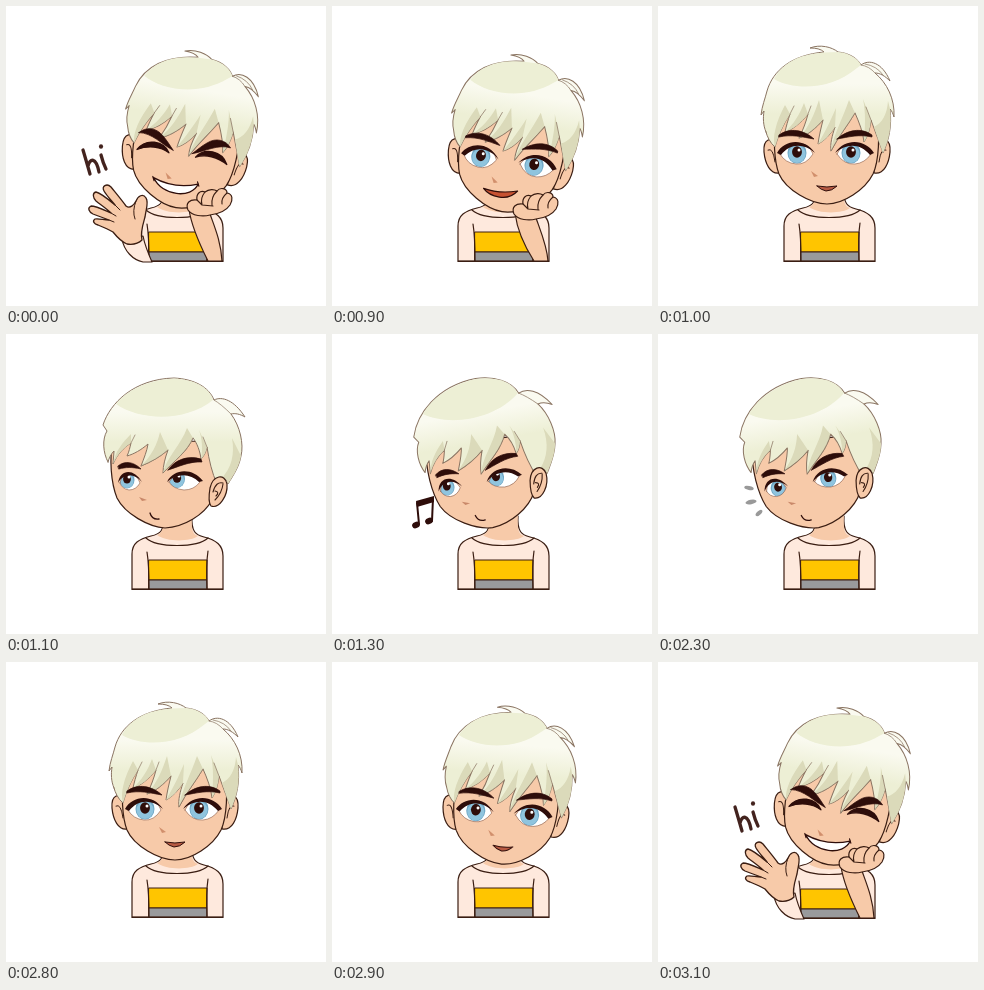
An HTML page with a canvas that plays this animation: 320 px wide and 300 px high, repeating every 4000 ms.

```html
<!DOCTYPE html>
<html lang="en">
<head>
<meta charset="utf-8">
<title>Hi</title>
<style>
html, body { margin: 0; width: 100%; height: 100%; overflow: hidden; background: #fff; }
canvas { display: block; }
</style>
</head>
<body>
<canvas id="stage" width="320" height="300"></canvas>
<script>
const ctx = document.getElementById('stage').getContext('2d');
const LOOP = 4000;
const INK = '#3a1d12', DARK = '#2e0d0a', HAIR_LINE = '#8a7462';
const PALE = '#fee9dd', SKIN = '#f7caa9', HAIR = '#edefd5', SHADE = '#dbdaba', SHINE = '#fafaf0';

function shape(d, fill, line, width = 1.2) {
  const p = new Path2D(d);
  if (fill) { ctx.fillStyle = fill; ctx.fill(p); }
  if (line) { ctx.strokeStyle = line; ctx.lineWidth = width; ctx.stroke(p); }
}

function oval(x, y, rx, ry, fill, turn = 0) {
  ctx.beginPath();
  ctx.ellipse(x, y, rx, ry, turn, 0, Math.PI * 2);
  ctx.fillStyle = fill;
  ctx.fill();
}

// Moves the point (px, py) to (x, y) and turns the drawing around it.
function placed(x, y, deg, px, py, draw) {
  ctx.save();
  ctx.translate(x, y);
  ctx.rotate(deg * Math.PI / 180);
  ctx.translate(-px, -py);
  draw();
  ctx.restore();
}

function hairTone() {
  const g = ctx.createLinearGradient(0, 78, 0, 108);
  g.addColorStop(0, SHINE);
  g.addColorStop(1, HAIR);
  return g;
}

function eye(white, lid, x, y, r) {
  ctx.save();
  ctx.clip(new Path2D(white));
  shape(white, '#fff');
  oval(x, y, r, r + 1, '#6fa6c4');
  oval(x, y + 1, r - 1, r - .5, '#8fc4de');
  oval(x, y - 1, r * .52, r * .6, DARK);
  oval(x + 2, y - 3, 1.5, 1.5, '#fff');
  ctx.restore();
  shape(white, null, '#8b6355', .6);
  shape(lid, DARK);
}

function body(waving) {
  ctx.save();
  if (waving) {
    ctx.beginPath();
    ctx.rect(136, 175, 100, 85);
    ctx.clip();
  }
  shape('M126 255V220C126 209 133 205 145 202C154 200 158 198 158 182H186C185 198 190 201 198 203C210 206 217 211 217 222V255Z', PALE, INK);
  shape('M158 181H186C185 197 187 200 192 202C184 208 160 208 151 201C156 199 158 195 158 181Z', SKIN);
  shape('M143 226H201V246H143Z', '#ffc500', INK, 1);
  shape('M143 246H201V255H143Z', '#999a9c', INK, 1);
  shape('M140 204C151 214 191 214 202 204M141 218Q143 230 143 255M202 217Q200 230 201 255', null, INK);
  shape('M126 255.3H217', null, INK);
  ctx.restore();
}

function frontHair() {
  shape('M108 126C105 119 105 112 106 105L103 109C104 100 107 93 109 85C115 64 134 49 166 46C163 43 158 42 152 42C162 38 174 41 180 46C192 47 200 53 203 59C211 53 224 56 232 75C227 70 222 67 217 67C229 77 237 93 236 111C235 108 234 105 232 103C234 120 231 134 225 147C222 138 218 128 213 114C212 123 210 130 206 136C205 126 201 116 197 107C190 119 180 131 173 145C172 138 174 130 177 121C172 129 166 135 160 138C161 130 163 122 165 114C158 122 150 129 141 132C145 124 148 116 150 108C143 117 134 124 127 126C128 121 130 114 132 108C125 119 120 130 117 141C112 137 109 130 108 126Z', hairTone(), HAIR_LINE, 1);
  shape('M116 73C135 84 172 85 199 62L203 59C200 53 192 47 180 46L166 46.5C140 48 124 58 116 73Z', HAIR);
  shape('M197 107C190 119 180 131 173 145C174 132 185 112 191 94ZM177 121C172 129 166 135 160 138C167 126 172 116 178 102ZM165 114C158 122 150 129 141 132C151 121 156 109 161 94ZM150 108C143 117 134 124 127 126C135 119 142 108 146 97ZM132 108C125 119 120 130 117 141C114 131 118 116 127 99ZM213 114C212 123 210 130 206 136C207 122 208 107 205 93ZM232 103C234 120 231 134 225 147C222 139 219 130 216 121C224 117 229 109 230 95Z', SHADE);
  shape('M197 107C190 119 180 131 173 145M165 114C158 122 150 129 141 132M132 108L136 100M150 108L153 100M213 114L208 101M203 59Q211 60 217 67M207 58Q219 60 225 69', null, HAIR_LINE, .7);
}

function frontHead(mood) {
  shape('M121 140C113 129 105 133 106 146C107 157 112 169 122 167Z', SKIN, INK);
  shape('M217 140C225 129 233 133 232 146C231 157 226 169 216 167Z', SKIN, INK);
  shape('M110 144Q115 141 117 156M228 144Q223 141 221 156', null, INK, 1);
  shape('M118 105C115 135 116 155 121 168C128 184 153 198 169 198C185 198 207 184 215 168C221 155 222 130 219 105Z', SKIN, INK);
  const glad = mood === 'glad';
  if (!glad) {
    eye('M122 148Q128 137 139 137Q151 137 155 148Q148 159 138 158Q127 157 122 148Z',
      'M119 147C126 134 146 131 157 147C146 137 132 137 123 149Z', 139, 147, 9.5);
    eye('M179 148Q184 137 195 137Q207 137 213 148Q207 157 197 158Q186 159 179 148Z',
      'M177 147C188 131 208 134 216 147L212 149C202 137 189 137 177 147Z', 193, 147, 9.5);
  }
  shape('M153 165L160 170L156 171Z', '#d18f6c');
  if (glad) {
    shape('M142 172Q164 180 187 171C183 187 153 189 142 172Z', '#fff', DARK, 1.3);
    shape('M141 171L143 175M186 169L188 173', null, DARK, 1.2);
  } else if (mood === 'open') {
    shape('M147 178Q163 181 181 175Q175 184 164 184Q153 184 147 178Z', '#c75232', DARK, 1.2);
  } else {
    shape('M159 180Q169 182 179 180Q174 185 168 185Q163 184 159 180Z', '#b85b43', DARK, 1);
  }
  frontHair();
  if (glad) {
    shape('M121 147C128 134 146 134 153 145C144 140 131 141 121 147ZM180 145C187 134 205 134 212 147C202 141 189 140 180 145Z', DARK, DARK, 1.3);
    shape('M120 130C126 123 136 122 144 129C149 133 153 138 157 142C145 138 133 128 120 130ZM176 142C180 138 184 133 189 129C197 122 207 123 213 130C200 128 188 138 176 142Z', DARK, DARK, .7);
  } else {
    shape('M121 129C132 121 146 124 156 133C144 131 134 128 121 131ZM179 133C189 124 203 121 214 129V131C201 128 191 131 179 133Z', DARK, DARK, .7);
  }
}

function sideHair() {
  shape('M102 128C97 119 96 105 101 97L97 91C104 69 128 45 168 44C188 45 203 53 208 66C216 62 228 66 239 83C234 80 229 79 225 80C234 92 238 110 235 122C233 133 228 140 222 150C221 146 219 143 216 144L211 150C206 139 203 126 201 113C200 118 198 122 195 125C194 117 191 109 187 104C181 118 169 126 157 139C157 132 159 124 162 116C154 123 145 128 135 132C138 124 141 117 142 110C135 116 128 120 121 122C123 118 124 113 125 109C117 114 111 121 107 130L108 117C105 120 103 124 102 128Z', hairTone(), HAIR_LINE, 1);
  shape('M110 70C134 87 180 88 207 66C203 53 188 45.5 168 44.5C141 46 120 57 110 70Z', HAIR);
  shape('M187 104C181 118 169 126 157 139C160 124 175 111 181 94ZM162 116C154 123 145 128 135 132C146 121 151 111 154 98ZM125 109C117 114 111 121 107 130C109 118 116 109 125 100ZM201 113C200 118 198 122 195 125C197 115 196 104 193 96ZM235 122C233 133 228 140 222 150C221 146 219 143 216 144C225 134 229 121 226 104Z', SHADE);
  shape('M187 104C181 118 169 126 157 139M162 116C154 123 145 128 135 132M125 109L129 101M201 113L197 103M208 66Q215 70 225 80', null, HAIR_LINE, .7);
}

// look: 0 to the side, 1 to the viewer
function sideHead(look, whistle) {
  shape('M107 105C103 125 105 149 111 164C119 180 143 193 159 194C178 193 198 181 206 166L214 108Z', SKIN, INK);
  sideHair();
  shape('M204 154C207 141 219 139 221 150C222 162 213 175 205 172C202 168 203 160 204 154Z', SKIN, INK);
  shape('M207 158Q210 147 217 149M217 150Q216 159 209 166M209 157Q214 158 210 162', null, INK, 1.1);
  eye('M114 149Q116 139 123 139Q131 140 134 149Q130 156 123 156Q116 155 114 149Z',
    'M112 149C114 135 128 134 136 148C128 139 118 139 112 149Z', 121 + look * 5, 146 + look * 2, 7.5);
  eye('M163 148Q169 139 179 139Q190 139 194 148Q188 156 178 156Q167 155 163 148Z',
    'M161 148C168 134 187 134 197 147L193 148C184 139 171 139 161 148Z', 171 + look * 6, 145 + look * 2, 8);
  shape('M112 132C119 126 128 128 135 135C126 133 120 133 113 135ZM162 136C169 126 181 121 195 125L196 128C184 127 172 133 162 136Z', DARK, DARK, .7);
  shape('M133 163L141 166L136 167Z', '#c98869');
  if (whistle) oval(148, 183, 2.6, 3.2, '#7c2f24');
  else shape('M144 179Q146 186 153 185', null, DARK, 1.3);
}

function propArm(dy) {
  ctx.save();
  ctx.translate(0, dy);
  shape(`M183 207C185 223 193 241 202 ${255 - dy}H216C215 240 209 226 204 212Z`, SKIN, INK);
  shape('M182 208C179 201 184 197 191 198C190 192 194 188 199 190C203 187 208 187 211 189C214 185 221 186 221 191C227 192 227 198 224 203C220 209 212 212 204 213C197 215 186 214 182 208Z', SKIN, INK);
  shape('M199 190Q194 196 196 203M211 189Q205 195 206 203M221 191Q215 196 216 202M191 198L196 203L207 204', null, INK, 1.1);
  ctx.restore();
}

function waveArm() {
  shape('M116 233C118 245 127 254 137 256H146C142 247 139 240 137 230Z', PALE, INK);
  shape('M120 200C115 193 109 186 105 181C101 177 95 180 98 185C101 190 105 194 109 199C102 193 95 187 90 186C86 187 87 192 90 195C95 199 101 203 105 207C98 204 90 200 85 200C81 202 83 206 87 208C92 210 98 212 103 214C98 214 92 212 89 213C86 215 88 218 92 219C97 221 102 223 107 226C111 231 116 236 121 238C128 239 133 237 136 234C134 227 137 218 139 211C140 203 143 196 140 192C137 187 132 190 130 195C128 199 124 203 120 200Z', SKIN, INK, 1.3);
  shape('M109 199L114 204M105 207L110 210M103 214L108 216M130 195Q126 205 129 213', null, INK, 1);
}

function hi() {
  const brown = '#43231e';
  shape('M77 144Q80 154 84 168M82 160C84 152 90 151 93 166M95 149Q97 157 100 163', null, brown, 3.3);
  oval(95, 140.5, 2.1, 2.2, brown);
}

function note(x, y, turn) {
  placed(x, y, turn, 91, 179, () => {
    oval(84, 191, 4, 3.1, DARK, -.4);
    oval(97, 187, 4, 3.1, DARK, -.4);
    shape('M87 190L85 169L101 164L100 187', null, DARK, 2);
    shape('M84 167L102 162V168L85 173Z', DARK);
  });
}

function marks() {
  oval(91, 154, 4.8, 2, '#999', .2);
  oval(93, 168, 5.6, 2.2, '#999', -.2);
  oval(101, 179, 4.2, 2, '#999', -.75);
}

function front(tilt, lift, mood) {
  body(mood === 'glad');
  placed(166.5 + 9.5 * tilt, 146.5 + 8 * tilt - lift, 9.5 * tilt, 166.5, 146.5, () => frontHead(mood));
}

function side(tilt, look = 0, whistle = false) {
  body(false);
  placed(150 - 6.5 * tilt, 146 + 2 * tilt, -10 * tilt, 150, 146, () => sideHead(look, whistle));
}

function greet(drop) {
  ctx.save();
  ctx.translate(0, drop);
  front(1, 4, 'glad');
  propArm(-4);
  waveArm();
  hi();
  ctx.restore();
}

function lean() {
  front(1, 0, 'open');
  propArm(0);
}

function tune() {
  side(1, 0, true);
  note(73, 112, -8);
  note(80, 170, 0);
  note(94, 228, 8);
}

const scenes = [
  [0, () => greet(0)],
  [900, lean],
  [1000, () => front(0, 0, 'calm')],
  [1100, () => side(0)],
  [1200, () => side(.5)],
  [1300, () => { side(1); note(91, 179, 0); }],
  [1800, tune],
  [2300, () => { side(1, 1); marks(); }],
  [2800, () => front(0, 0, 'calm')],
  [2900, () => front(.5, 0, 'calm')],
  [3000, lean],
  [3100, () => greet(1)]
];

let start = null;
function tick(now) {
  if (start === null) start = now;
  const t = (now - start) % LOOP;
  ctx.fillStyle = '#fff';
  ctx.fillRect(0, 0, 320, 300);
  ctx.lineCap = ctx.lineJoin = 'round';
  scenes.filter(s => s[0] <= t).pop()[1]();
  requestAnimationFrame(tick);
}
requestAnimationFrame(tick);
</script>
</body>
</html>
```
